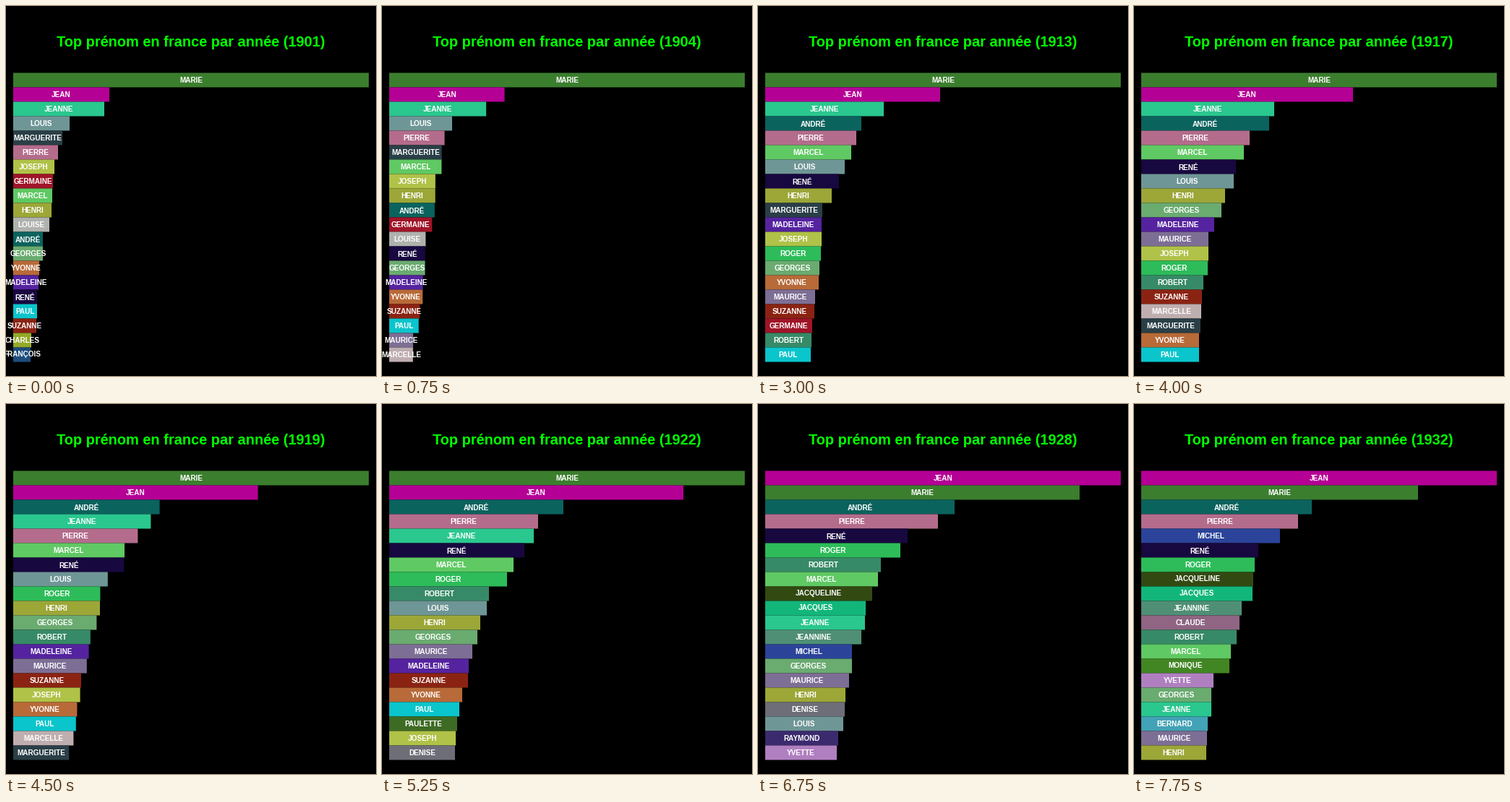
Recreate the animation shown at these times as a matplotlib script. Size 512 by 512 pixels, loop 8000 ms.

```python
import matplotlib.pyplot as plt
import numpy as np
from matplotlib.animation import FuncAnimation
from matplotlib.patches import Rectangle

SIZE, DPI = 512, 72
FIRST_YEAR, LAST_YEAR = 1901, 1932
ROWS, ROW_H = 20, 20
LEFT, TOP, FULL = 10, 92.5, 492
KEY_YEARS = [1901, 1908, 1913, 1917, 1922, 1928, 1932]

plt.rcParams["font.family"] = "Liberation Sans"
plt.rcParams["font.weight"] = "bold"

years = np.arange(FIRST_YEAR, LAST_YEAR + 1)
tracks = []


def track(name, color, *widths, start=0):
    """Add a name whose bar widths are known at successive key years."""
    keys = KEY_YEARS[start:start + len(widths)]
    tracks.append((name, color, np.interp(years, keys, widths, left=0)))


# Order matters: earlier names win ties.
track("MARIE", "#3b7e2e", 492, 492, 492, 492, 492, 435, 383)
track("JEAN", "#b50095", 133, 195, 242, 293, 407, 492, 492)
track("LOUIS", "#6f9696", 78, 99, 110, 128, 135, 108, 85)
track("MARGUERITE", "#2a3f47", 68, 79, 79, 82, 70)
track("PIERRE", "#b46c8c", 62, 96, 126, 150, 206, 239, 217)
track("GERMAINE", "#a01428", 55, 65, 65, 72, 70)
track("MARCEL", "#5fc963", 54, 97, 119, 142, 172, 156, 124)
track("HENRI", "#9ca738", 53, 78, 92, 116, 126, 111, 90)
track("ANDRÉ", "#0b635e", 41, 92, 133, 177, 241, 262, 236)
track("MICHEL", "#2b449a", 12, 25, 58, 120, 192, start=2)
track("GEORGES", "#6aab70", 41, 61, 75, 111, 122, 120, 97)
track("JEANNE", "#2ac78f", 126, 145, 164, 184, 200, 138, 97)
track("YVONNE", "#b86a38", 36, 60, 74, 80, 101, 85)
track("MADELEINE", "#55239f", 35, 62, 78, 101, 110, 92, 70)
track("MAURICE", "#7d6e95", 22, 48, 69, 93, 115, 116, 91)
track("JOSEPH", "#b0c247", 57, 73, 78, 93, 92, 85)
track("RENÉ", "#180840", 33, 72, 102, 131, 187, 197, 162)
track("PAUL", "#0ac5cb", 33, 51, 63, 80, 97, 92, 78)
track("LOUISE", "#b0b2ae", 50, 51, 55)
track("SUZANNE", "#8b2313", 32, 56, 68, 84, 109, 92, 70)
track("CHARLES", "#93a927", 25, 38, 48)
track("FRANÇOIS", "#1c4d7d", 24, 32, 40)
track("MARCELLE", "#bfaeb0", 23, 46, 62, 83, 84)
track("ROGER", "#2dbc59", 8, 38, 77, 92, 163, 187, 157)
track("ROBERT", "#378a67", 8, 36, 64, 86, 138, 160, 132)
track("PAULETTE", "#3d6b24", 30, 62, 94, 92, 70, start=2)
track("DENISE", "#6e6e78", 22, 55, 91, 110, 88, start=2)
track("JACQUELINE", "#324a11", 25, 62, 148, 155, start=3)
track("JACQUES", "#12b67b", 45, 78, 139, 154, start=3)
track("JEANNINE", "#4f8f75", 20, 55, 133, 139, start=3)
track("RAYMOND", "#3c2a6e", 65, 88, 101, 88, start=3)
track("YVETTE", "#b07fc0", 40, 75, 99, 100, start=3)
track("CLAUDE", "#8f6583", 40, 92, 136, start=4)
track("MONIQUE", "#428623", 20, 80, 122, start=4)
track("BERNARD", "#42a2b6", 35, 70, 92, start=4)

fig = plt.figure(figsize=(SIZE / DPI, SIZE / DPI), dpi=DPI, facecolor="black")
ax = fig.add_axes([0, 0, 1, 1])
ax.set_xlim(0, SIZE)
ax.set_ylim(SIZE, 0)
ax.axis("off")

title = ax.text(256, 56, "", color="#00ff00", size=20, ha="center", va="baseline")
bars, labels = [], []
for row in range(ROWS):
    bar = Rectangle((LEFT, TOP + row * ROW_H), 0, ROW_H, lw=0, snap=False)
    bars.append(ax.add_patch(bar))
    labels.append(ax.text(0, 0, "", color="white", size=10,
                          ha="center", va="baseline", zorder=3))


def baseline_shift(name):
    """Accents push a centred label down, descenders lift it."""
    if "É" in name:
        return 1
    return -1 if "Q" in name or "Ç" in name else 0


def update(frame):
    title.set_text(f"Top prénom en france par année ({FIRST_YEAR + frame})")
    ranked = sorted(tracks, key=lambda t: -round(t[2][frame], 3))[:ROWS]
    scale = FULL / ranked[0][2][frame]
    for row, (name, color, widths) in enumerate(ranked):
        width = widths[frame] * scale
        bars[row].set_width(width)
        bars[row].set_facecolor(color)
        labels[row].set_text(name)
        labels[row].set_position((LEFT + width / 2,
                                  106 + row * ROW_H + baseline_shift(name)))
    return [title, *bars, *labels]


anim = FuncAnimation(fig, update, frames=len(years), interval=250,
                     repeat=True, repeat_delay=0, blit=False)
plt.show()
```
